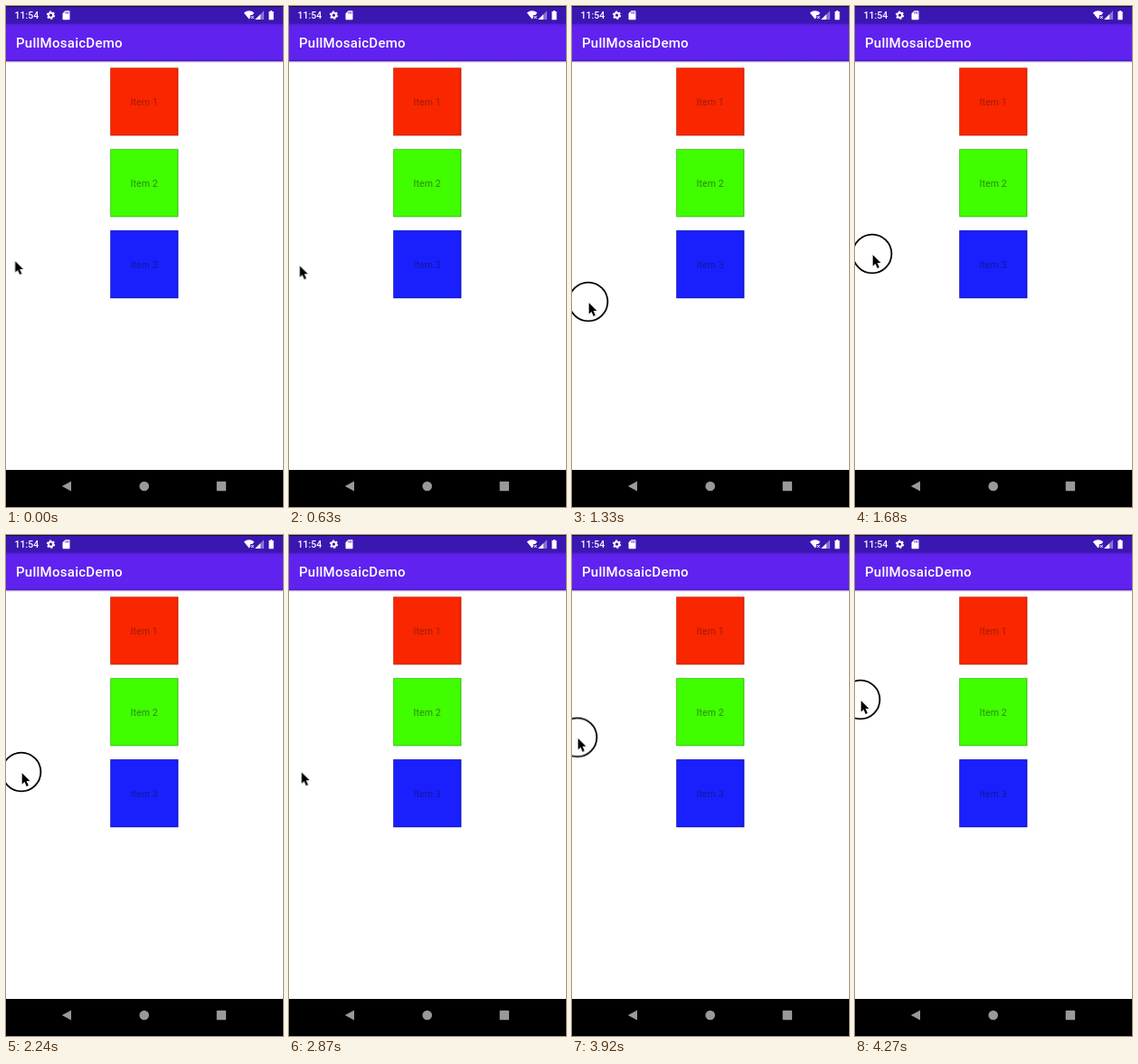
Write an HTML page that moves like this. It is 306x554 px and loops after 4.34 s.

```html
<!DOCTYPE html>
<html lang="en">
<head>
<meta charset="utf-8">
<title>PullMosaicDemo</title>
<style>
  html, body { margin: 0; width: 100%; height: 100%; overflow: hidden; background: #fff; }
  svg { display: block; width: 306px; height: 554px; font-family: Roboto, sans-serif; }
  .time { font-size: 10.5px; font-weight: 500; fill: #fff; }
  .title { font-size: 15px; font-weight: 500; letter-spacing: .25px; fill: #fff; }
  .item { font-size: 10.5px; letter-spacing: .1px; text-anchor: middle; }

  /* Each stretch advances in 70 ms steps */
  .pointer { animation: move 4340ms steps(1, jump-start) infinite; }
  .ring { animation: press 4340ms step-end infinite; }

  @keyframes move {
    0%     { transform: translate(10.5px, 282px); }
    14.51% { transform: translate(10.5px, 282px); animation-timing-function: steps(5, jump-start); }
    22.58% { transform: translate(19px, 308px); animation-timing-function: steps(3, jump-start); }
    27.41% { transform: translate(19px, 310px); animation-timing-function: steps(2, jump-start); }
    30.64% { transform: translate(19px, 337px); }
    32.25% { transform: translate(19px, 328px); animation-timing-function: steps(2, jump-start); }
    35.48%, 37.09% { transform: translate(20px, 276px); animation-timing-function: steps(2, jump-start); }
    40.32% { transform: translate(20px, 275px); }
    43.54% { transform: translate(20px, 275px); animation-timing-function: steps(6, jump-start); }
    53.22% { transform: translate(18px, 263px); }
    64.51% { transform: translate(18px, 263px); animation-timing-function: steps(8, jump-start); }
    77.41% { transform: translate(3px, 260px); }
    79.03% { transform: translate(7px, 258px); }
    85.48% { transform: translate(7px, 258px); animation-timing-function: steps(9, jump-start); }
    100%   { transform: translate(7px, 183px); }
  }
  @keyframes press {
    0%     { opacity: 0; }
    20.96% { opacity: 1; }
    58.06% { opacity: 0; }
    87.09%, 100% { opacity: 1; }
  }
</style>
</head>
<body>
<svg viewBox="0 0 306 554">
  <defs>
    <linearGradient id="bar" x2="0" y2="1">
      <stop offset="0" stop-color="#4a1bc8"/>
      <stop offset=".05" stop-color="#5a20e2"/>
      <stop offset=".12" stop-color="#6022ef"/>
      <stop offset=".94" stop-color="#6022ef"/>
      <stop offset="1" stop-color="#4a1bb8"/>
    </linearGradient>
  </defs>

  <rect width="306" height="554" fill="#fff"/>
  <rect y="61" width="306" height="1.5" fill="#ddd8e8"/>
  <rect y="19" width="306" height="42.3" fill="url(#bar)"/>
  <rect width="306" height="19.5" fill="#3b17b2"/>
  <rect width="306" height="1" fill="#150840"/>

  <text class="time" x="9.5" y="14">11:54</text>
  <g fill="none" stroke="#fff">
    <circle cx="49.5" cy="10.2" r="2.6" stroke-width="2"/>
    <circle cx="49.5" cy="10.2" r="4" stroke-width="1.4" stroke-dasharray="2.1 2.1"/>
  </g>
  <path d="M65.5 5.2h4.2q.8 0 .8 .8v8.4q0 .8-.8 .8h-6.4q-.8 0-.8-.8v-6.2z" fill="#fff"/>
  <path d="M65.8 6.5v2M67.4 6.5v2M69 6.5v2" stroke="#3b17b2" stroke-width=".8"/>

  <path d="M262.8 7.6q5.7-4.6 11.4 0l-2 2.4h-2.4v2.8l-1.3 1.8z" fill="#fff"/>
  <path d="M270.7 11l3 3m0-3l-3 3" stroke="#fff" stroke-width="1"/>
  <path d="M285 5.2v9.8h-9.8z" fill="#fff" fill-opacity=".4"/>
  <path d="M281 9.2v5.8h-5.8z" fill="#fff"/>
  <path d="M292 5h2v1h1.6v9.2h-5.2v-9.2h1.6z" fill="#fff"/>

  <text class="title" x="11" y="46">PullMosaicDemo</text>

  <!-- Darker edges, then faces -->
  <rect x="115.2" y="68.3" width="75.2" height="75.1" fill="#c42004"/>
  <rect x="115.2" y="158.2" width="75.2" height="75.1" fill="#36c40c"/>
  <rect x="115.2" y="248.1" width="75.2" height="75.1" fill="#1216b4"/>
  <rect x="116" y="69" width="73.2" height="73.4" fill="#f92600"/>
  <rect x="116" y="158.9" width="73.2" height="73.4" fill="#40fd00"/>
  <rect x="116" y="248.8" width="73.2" height="73.4" fill="#1a20fd"/>

  <text class="item" x="152.6" y="110" fill="#a01c08">Item 1</text>
  <text class="item" x="152.6" y="200" fill="#2b8a14">Item 2</text>
  <text class="item" x="152.6" y="290" fill="#1216a0">Item 3</text>

  <rect y="513" width="306" height="41" fill="#000"/>
  <g fill="#999">
    <path d="M72 525.4v11.2L61.8 531z"/>
    <circle cx="152.7" cy="531" r="5.3"/>
    <rect x="232.7" y="525.8" width="10.4" height="10.4" rx=".8"/>
  </g>

  <g class="pointer">
    <circle class="ring" cx="-1" cy="-1" r="21.4" fill="none" stroke="#000" stroke-width="1.8"/>
    <path d="M-.3 .2V12.4L2.5 9.9 4.8 15 6.8 14.1 4.6 9.1H8.4Z" fill="#000" stroke="#fff" stroke-width="1.2" paint-order="stroke" style="filter: drop-shadow(0 .6px .6px #0004)"/>
  </g>
</svg>
</body>
</html>
```
